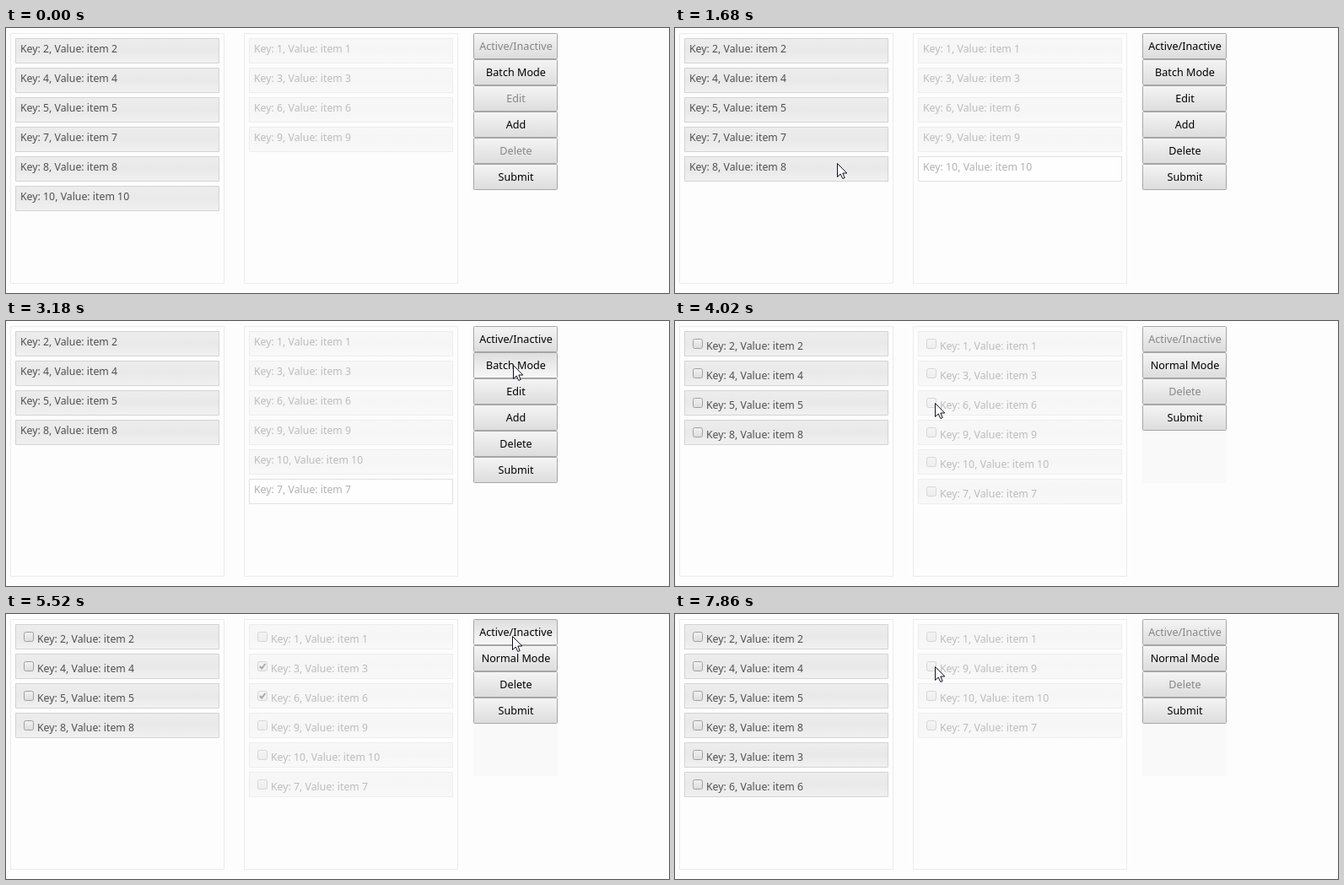
Recreate the animation shown at these times as an HTML page with a canvas. Size 786 px wide and 314 px high, loop 8000 ms.

```html
<!DOCTYPE html>
<html lang="en">
<head>
<meta charset="utf-8">
<title>Two-list item manager</title>
<style>
  html, body { margin: 0; width: 100%; height: 100%; overflow: hidden; background: #fdfdfd; }
  canvas { display: block; }
</style>
</head>
<body>
<canvas id="stage" width="786" height="314"></canvas>
<script>
const ctx = document.getElementById('stage').getContext('2d');
const LOOP = 8000, STEP = 60, SETTLE = 180;
const LEFT_X = 5, RIGHT_X = 282, ROW = 35, BUTTON = 31;

// Places the pointer visits
const spot = (x, y) => ({ x, y });
const inRow = (listX, row) => spot(listX + 26, 27 + row * ROW);
const activeButton = { ...spot(600, 26), button: 0 };
const modeButton = { ...spot(601, 52), button: 1 };

// Effects of a click on the state
const hover = () => {};
const select = key => s => { s.selected = key; };
const toggle = key => s => {
  s.checked = s.checked.includes(key) ? s.checked.filter(k => k !== key) : [...s.checked, key];
};
const batchMode = s => { s.batch = true; s.selected = 0; };
const swapLists = s => {
  const chosen = key => key === s.selected || s.checked.includes(key);
  const { left, right } = s;
  const keep = list => list.filter(key => !chosen(key));
  s.left = [...keep(left), ...right.filter(chosen)];
  s.right = [...keep(right), ...left.filter(chosen)];
};

// The pointer settles before each time and acts at it
const visits = [
  [60, spot(417, 158), hover],
  [480, spot(148, 204), hover],
  [780, spot(151, 208), select(10)],
  [1320, activeButton, swapLists],
  [1860, spot(192, 160), hover],
  [2040, spot(194, 127), select(7)],
  [2640, activeButton, swapLists],
  [3240, modeButton, batchMode],
  [4200, inRow(RIGHT_X, 2), toggle(6)],
  [4680, inRow(RIGHT_X, 1), toggle(3)],
  [5580, activeButton, swapLists],
  [6540, inRow(LEFT_X, 4), toggle(3)],
  [6900, inRow(LEFT_X, 5), toggle(6)],
  [7380, inRow(RIGHT_X, 1), hover]
].map(([time, place, act]) => ({ time, place, act }));

function stateAt(t) {
  const state = {
    left: [2, 4, 5, 7, 8, 10], right: [1, 3, 6, 9],
    selected: 0, checked: [], batch: false
  };
  visits.filter(v => v.time <= t).forEach(v => v.act(state));
  const pressing = visits.find(v => t < v.time && t >= v.time - STEP);
  state.pressed = pressing && pressing.place.button;
  return state;
}

function pointerAt(t) {
  if (t < visits[0].time + STEP) return null;
  const next = visits.findIndex(v => v.time - SETTLE > t);
  if (next < 0) return visits[visits.length - 1].place;
  const from = visits[next - 1], to = visits[next];
  const arrive = to.time - SETTLE;
  const leave = Math.min(from.time + STEP, arrive - STEP);
  const p = Math.max(0, (t - leave) / (arrive - leave));
  const eased = p * p * (3 - 2 * p);
  const mix = (a, b) => Math.round(a + (b - a) * eased);
  return spot(mix(from.place.x, to.place.x), mix(from.place.y, to.place.y));
}

function gradient(y, h, ...colors) {
  const g = ctx.createLinearGradient(0, y, 0, y + h);
  colors.forEach((color, i) => g.addColorStop(i / (colors.length - 1), color));
  return g;
}

function box(x, y, w, h, fill, stroke, radius = 0) {
  ctx.beginPath();
  ctx.roundRect(x + .5, y + .5, w - 1, h - 1, radius);
  ctx.fillStyle = fill;
  ctx.fill();
  ctx.strokeStyle = stroke;
  ctx.lineWidth = 1;
  ctx.stroke();
}

function text(label, x, y, size, color, align) {
  ctx.font = `${size}px "Noto Sans", "Open Sans", sans-serif`;
  ctx.textAlign = align;
  ctx.fillStyle = color;
  ctx.fillText(label, x, y);
}

const tick = new Path2D('M3 6L5.2 8.5L9.5 3');
const arrow = new Path2D('M.5 .5V16.5L4.2 13L6.8 18.5L9.2 17.5L6.8 12H11.8Z');

function strokeAt(path, x, y, color, width, fill) {
  ctx.save();
  ctx.translate(x, y);
  if (fill) {
    ctx.fillStyle = fill;
    ctx.fill(path);
  }
  ctx.strokeStyle = color;
  ctx.lineWidth = width;
  ctx.stroke(path);
  ctx.restore();
}

function drawItem(key, x, y, { batch, selected, checked }) {
  const active = key === selected;
  const fill = active ? '#fff' : gradient(y, 30, '#ededed', '#e9e9e9', '#f1f1f1');
  box(x, y, 242, 30, fill, active ? '#aaa' : '#d3d3d3');
  if (batch) {
    box(x + 10, y + 9, 12, 12, gradient(y + 9, 12, '#f2f2f2', '#dcdcdc'), '#a0a0a0', 2);
    if (checked.includes(key)) strokeAt(tick, x + 10, y + 9, '#222', 2);
  }
  text(`Key: ${key}, Value: item ${key}`, x + (batch ? 26 : 6), y + (batch ? 22 : 17),
    12.3, active ? '#212121' : '#505050', 'left');
}

function drawList(keys, x, opacity, state) {
  box(x, 6, 254, 297, '#fdfdfd', '#ebebeb');
  ctx.globalAlpha = opacity;
  keys.forEach((key, i) => drawItem(key, x + 6, 12 + i * ROW, state));
  ctx.globalAlpha = 1;
}

function drawButtons({ batch, selected, checked, pressed }) {
  const labels = batch
    ? ['Active/Inactive', 'Normal Mode', 'Delete', 'Submit']
    : ['Active/Inactive', 'Batch Mode', 'Edit', 'Add', 'Delete', 'Submit'];
  const needsItem = ['Active/Inactive', 'Edit', 'Delete'];
  const hasItem = selected || checked.length;
  if (batch) {
    ctx.fillStyle = '#f9f9f9';
    ctx.fillRect(554, 130, 100, 2 * BUTTON);
  }
  labels.forEach((label, i) => {
    const y = 6 + i * BUTTON;
    const shades = i === pressed ? ['#dedede', '#f8f8f8'] : ['#f5f5f5', '#dcdcdc'];
    box(554, y, 100, BUTTON, gradient(y, BUTTON, ...shades), '#a6a6a6', 1);
    const disabled = needsItem.includes(label) && !hasItem;
    text(label, 604.5, y + 20, 12.6, disabled ? '#868686' : '#000', 'center');
  });
}

function render() {
  const t = Math.floor(performance.now() % LOOP / STEP) * STEP;
  const state = stateAt(t), pointer = pointerAt(t);
  ctx.fillStyle = '#fdfdfd';
  ctx.fillRect(0, 0, 786, 314);
  drawList(state.left, LEFT_X, 1, state);
  drawList(state.right, RIGHT_X, .35, state);
  drawButtons(state);
  if (pointer) strokeAt(arrow, pointer.x, pointer.y, '#111122', 1, '#fff');
  requestAnimationFrame(render);
}
render();
</script>
</body>
</html>
```
